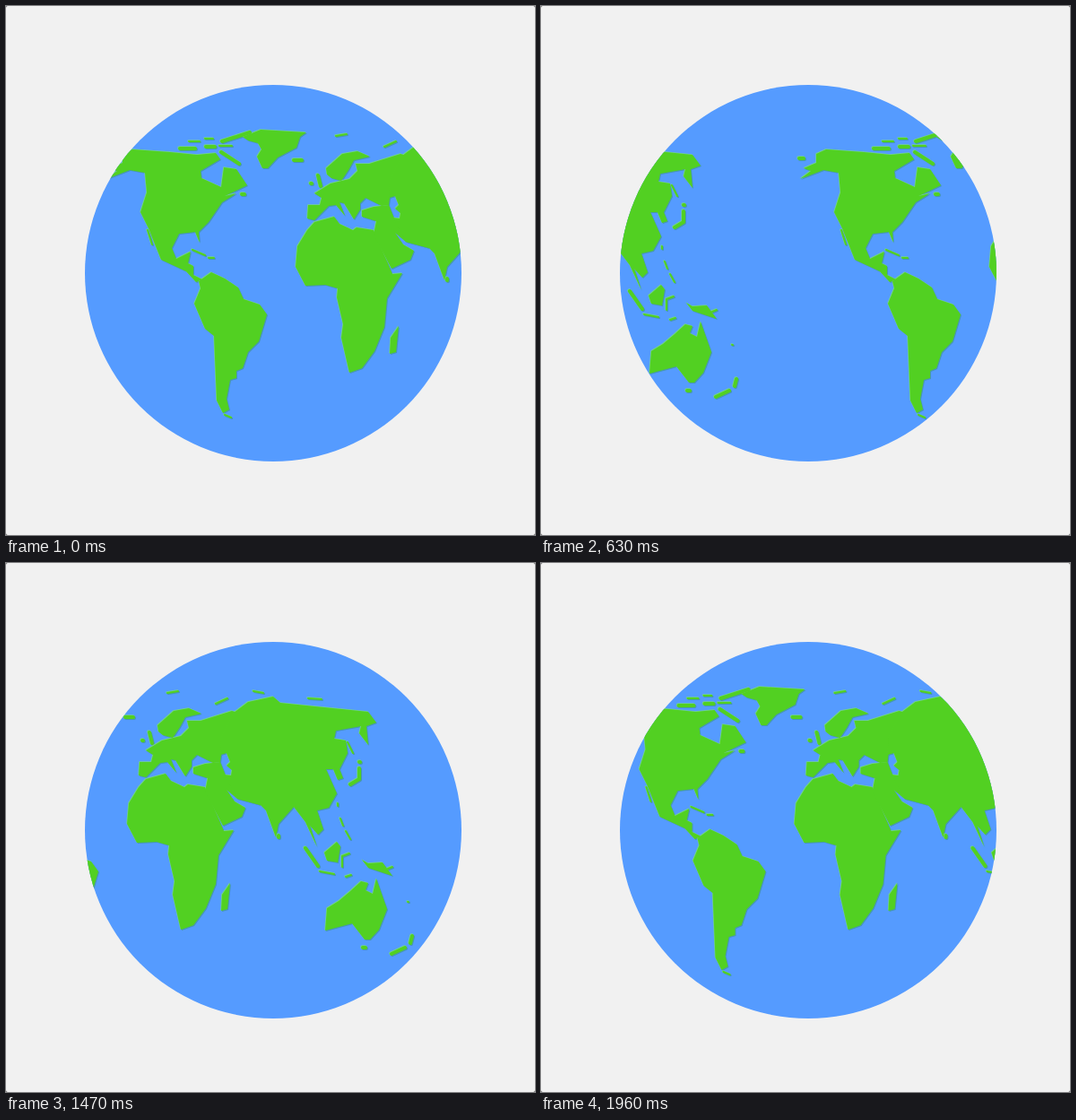
An HTML page that plays this animation: 590 by 590 pixels, repeating every 2030 ms.

```html
<!DOCTYPE html>
<html lang="en">
<head>
<meta charset="utf-8">
<title>Turning globe</title>
<style>
  html, body { margin: 0; width: 100%; height: 100%; overflow: hidden; background: #555; }
  svg { display: block; width: 590px; height: 590px; background: #f1f1f1; border-radius: 2px; }
  #land path { fill: currentColor; }
  #land .isles { fill: none; stroke: currentColor; stroke-width: 4px; stroke-linecap: round; stroke-linejoin: round; }
  #land .thin { stroke-width: 2px; }
</style>
</head>
<body>
<svg viewBox="0 0 590 590">
  <defs>
    <clipPath id="disc"><circle cx="298" cy="298" r="210"/></clipPath>

    <g id="land">
      <path id="north-america" d="M116 181L130 175 130 165 141 160 183 163 213 166 234 164 239 171 217 184 218 192 240 202 243 180 257 182 269 200 244 212 257 209 241 219 226 241 215 252 216 264 211 252 193 254 185 270 190 282 206 274 203 287 209 290 209 300 219 305 212 308 201 296 173 283 159 248 150 230 157 208 155 186 138 183 112 193 124 184Z"/>
      <path id="south-america" d="M215 307L229 297 244 304 259 314 265 327 283 333 291 344 282 374 270 386 264 404 257 407 257 415 250 417 246 438 249 450 242 454 235 440 232 368 222 360 210 332 217 315Z"/>
      <path id="greenland" d="M264 146L284 138 335 141 328 146 324 158 303 169 292 181 286 181 280 168 285 160 281 153 270 150Z"/>
      <path class="isles" d="M194 159h17M223 157h10M240 163l20 13M241 151l31-10M321 172h9M111 170h5M263 210h3"/>
      <path class="isles thin" d="M204 151h12M222 148h9M238 156h14M208 272l14 6M226 281h6M158 250l5 16M244 456l7 3"/>

      <g transform="translate(188)">
        <path id="africa" d="M156 241L178 235 184 243 199 250 203 247 222 250 243 299 254 298 237 326 234 358 223 385 209 404 195 409 186 370 188 355 181 325 182 315 168 311 146 312 135 291 137 268 148 250Z"/>
        <path id="madagascar" d="M250 357L247 386 240 388 241 370Z"/>
        <path id="europe" d="M149 222L148 237 156 239 172 223 180 222 190 234 184 219 189 220 200 238 207 227 207 220 213 214 231 223 239 222 240 214 262 168 252 165 217 176 202 176 204 184 195 193 174 198 156 209 164 214 162 222Z"/>
        <path id="scandinavia" d="M170 188L169 181 187 165 204 162 218 168 200 172 194 183 186 195 175 192Z"/>
        <path id="arabia" d="M209 228L222 224 239 222 245 237 284 270 258 263 246 253 255 266 267 273 263 283 242 293 222 255 225 240 209 235Z"/>
        <path id="asia" d="M240 195L239 214 246 212 250 222 246 226 252 231 251 237 243 236 258 263 284 270 290 276 301 306 304 291 321 272 334 289 347 317 339 293 348 303 354 297 347 276 360 273 369 257 357 230 365 230 370 242 376 240 372 230 381 212 379 198 366 196 368 187 396 182 394 190 404 203 402 182 413 178 404 166 335 159 306 156 298 149 270 155 254 167Z"/>
        <path id="australia" d="M356 410L358 385 371 377 384 366 396 355 404 357 401 365 409 369 413 352 425 386 416 409 406 420 400 420 386 402 367 407Z"/>
        <path id="borneo" d="M355 323L369 311 373 316 370 334 358 332Z"/>
        <path id="papua" d="M397 331L404 335 420 334 431 349 404 340Z"/>
        <path class="isles" d="M160 189l3 12M152 198h1M334 318l14 20M394 222h1M394 229v12l-10 6M453 416l-2 8M445 429l-15 7M398 429h3M304 304v2"/>
        <path class="isles thin" d="M180 145l12-2M234 157l13-6M276 143l11 2M337 151l15 1M381 200l6 12M373 285l3 8M379 299l5 9M350 344l16 3M375 339v-12l8-3M426 341l5-2M379 350l6-2M448 378h1M370 268v3"/>
      </g>
    </g>

    <g id="world">
      <use href="#land" x="1" y="1" color="#4796b4"/>
      <use href="#land" x="-.7" y="-.7" color="#72d489"/>
      <use href="#land" color="#52d022"/>
    </g>
  </defs>

  <g clip-path="url(#disc)">
    <rect width="590" height="590" fill="#559bff"/>
    <g id="map">
      <use href="#world" x="-600"/>
      <use href="#world"/>
    </g>
  </g>
</svg>
<script>
  const LOOP = 2030, STEP = 70;
  // [step, shift in px]; one full turn is 600 px
  const keys = [[0, 0], [6, 117], [13, 257], [17, 332], [21, 412], [25, 492], [28, 559.5]];
  const map = document.getElementById('map');
  const start = performance.now();

  function shiftAt(step) {
    const i = Math.max(1, keys.findIndex(k => k[0] >= step));
    const [s0, x0] = keys[i - 1], [s1, x1] = keys[i];
    return x0 + (x1 - x0) * (step - s0) / (s1 - s0);
  }

  function draw(now) {
    const time = Math.max(0, now - start) % LOOP;
    map.setAttribute('transform', `translate(${shiftAt(Math.floor(time / STEP))})`);
    requestAnimationFrame(draw);
  }
  draw(start);
</script>
</body>
</html>
```
